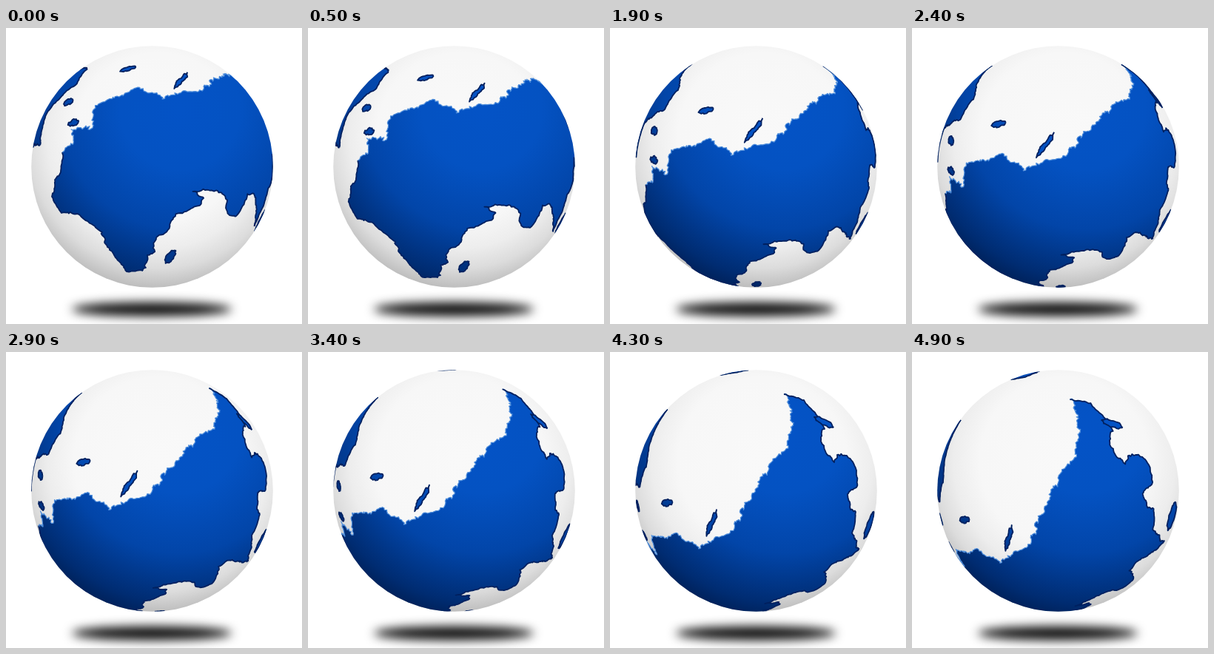
Recreate the animation shown at these times as an HTML page with a canvas. Size 400 px wide and 400 px high, loop 5000 ms.

```html
<!DOCTYPE html>
<html lang="en">
<head>
<meta charset="utf-8">
<title>Turning globe</title>
<style>
  html, body { margin: 0; width: 100%; height: 100%; overflow: hidden; background: #fff; }
  canvas { display: block; width: 400px; height: 400px; }
</style>
</head>
<body>
<canvas id="stage" width="400" height="400"></canvas>
<script>
const ctx = document.getElementById('stage').getContext('2d');
const CX = 197.5, CY = 187.5, R = 163.3;
const STEPS = 50, STEP_MS = 100;
const DARK = { stroke: '#00205f', width: 1.8, tooth: 0.011 };
const LIGHT = { stroke: '#4f8edb', width: 1.2, tooth: 0.024 };

let seed = 7;
const rnd = () => (seed = (seed * 16807) % 2147483647) / 2147483647 - 0.5;

const apply = (m, v) => m.map(r => r[0] * v[0] + r[1] * v[1] + r[2] * v[2]);
const flip = m => m.map((_, i) => m.map(r => r[i]));
const unit = v => { const n = Math.hypot(...v); return v.map(c => c / n); };

function rotation(w) {
  const a = Math.hypot(...w), [x, y, z] = unit(w);
  const c = Math.cos(a), s = Math.sin(a), k = 1 - c;
  return [
    [c + x * x * k, x * y * k - z * s, x * z * k + y * s],
    [x * y * k + z * s, c + y * y * k, y * z * k - x * s],
    [x * z * k - y * s, y * z * k + x * s, c + z * z * k]
  ];
}

// The spin axis drifts slowly, so the poses are composed step by step.
const poses = [[[1, 0, 0], [0, 1, 0], [0, 0, 1]]];
for (let i = 0; i < STEPS - 1; i++) {
  const t = (i + 0.5) / 10, rad = Math.PI / 180;
  const phi = (12.5 * t - 12) * rad, size = 15.5 - 0.4 * t;
  const w = [size * Math.cos(phi), 0.4 * t - 10.2, size * Math.sin(phi)];
  const turn = rotation(w.map(c => c * rad / 10));
  poses.push(flip(flip(poses[i]).map(c => apply(turn, c))));
}

// Points outside the disc stand for the far side of the sphere.
function lift(pose, x, y) {
  let u = (x - CX) / R, v = (CY - y) / R;
  const r = Math.hypot(u, v);
  let z = Math.sqrt(Math.max(0, 1 - r * r));
  if (r > 1) {
    const q = 2 - r;
    u *= q / r; v *= q / r; z = -Math.sqrt(1 - q * q);
  }
  return apply(flip(pose), [u, v, z]);
}

function flat(pose, p) {
  const [x, y, z] = apply(pose, p);
  const r = Math.hypot(x, y) || 1e-6;
  const k = z >= 0 ? 1 : (2 - r) / r;
  return [CX + x * k * R, CY - y * k * R];
}

// Midpoint displacement gives the ragged shoreline.
function crinkle(a, b, tooth) {
  const len = Math.hypot(...a.map((c, j) => c - b[j]));
  if (len < 0.026) return [a];
  const push = tooth + Math.min(len, 0.15) * 0.15;
  const mid = unit(a.map((c, j) => (c + b[j]) / 2 + rnd() * push));
  return [...crinkle(a, mid, tooth), ...crinkle(mid, b, tooth)];
}

// Each part is [step, edge, x, y, x, y, ...]; parts join into a closed shape.
function land(...parts) {
  const raw = parts.map(([step, , ...xy]) =>
    xy.flatMap((x, i) => i % 2 ? [] : [lift(poses[step], x, xy[i + 1])]));
  return parts.map(([, edge], i) => {
    const pts = [...raw[i], raw[(i + 1) % raw.length][0]];
    const fine = pts.slice(1).flatMap((p, k) => crinkle(pts[k], p, edge.tooth));
    return { edge, pts: [...fine, pts[pts.length - 1]] };
  });
}

function isle(step, x, y, rx, ry, tilt) {
  const xy = [], c = Math.cos(tilt), s = Math.sin(tilt);
  for (let a = 0; a < 6.2; a += Math.PI / 4) {
    const u = rx * Math.cos(a), v = ry * Math.sin(a);
    xy.push(x + u * c - v * s, y + u * s + v * c);
  }
  return land([step, DARK, ...xy]);
}

const lands = [
  land(
    [0, DARK, 185,328, 163,329, 140,300, 130,276, 100,253, 75,250, 62,228, 66,205, 74,193],
    [0, LIGHT, 76,168, 91,156, 88,137, 105,135, 117,135, 121,108, 150,92, 178,80, 205,90],
    [24, LIGHT, 150,193, 165,186, 203,175, 222,158, 232,142, 257,117, 270,105, 290,97],
    [43, LIGHT, 242,118, 244,88],
    [43, DARK, 235,57, 262,65, 275,80, 290,104, 285,115, 295,140, 303,149, 307,139, 320,140,
      333,160, 333,183, 321,192, 325,213, 332,216, 327,245, 333,262],
    [24, DARK, 325,285, 302,276, 290,283],
    [11, DARK, 289,286, 276,283, 272,269, 257,261, 223,265, 239,272, 234,281, 201,292, 194,308],
    [0, DARK, 203,283, 200,303, 191,307]),
  land(
    [19, DARK, 111,48, 92,84, 80,98, 74,110, 47,128],
    [49, DARK, 25,225, 15,150, 30,85, 60,88]),
  isle(49, 152, 29, 22, 5, -0.28),
  isle(49, 351, 222, 20, 4, -1.3),
  isle(43, 289, 95, 15, 4, 0.5),
  isle(24, 117, 130, 10, 4, -0.2),
  isle(24, 180, 158, 21, 3, -0.96),
  isle(19, 60, 139, 4, 6, 0),
  isle(0, 91, 128, 8, 4, -0.4),
  isle(0, 222, 309, 11, 5, -0.95)
];

function trace(pose, pts, start) {
  pts.forEach((p, i) => {
    const [x, y] = flat(pose, p);
    if (i || !start) ctx.lineTo(x, y); else ctx.moveTo(x, y);
  });
}

function radial(x, y, r, stops) {
  const g = ctx.createRadialGradient(x, y, 0, x, y, r);
  stops.forEach(([at, colour]) => g.addColorStop(at, colour));
  return g;
}

const white = radial(206, 148, 208,
  [[0, '#f9f9f9'], [0.55, '#f7f7f7'], [0.72, '#ededed'], [0.85, '#dcdcdc'], [1, '#b8b8b8']]);
const blue = radial(235, 110, 270,
  [[0, '#0453c6'], [0.3, '#0452c2'], [0.6, '#0245a8'], [0.85, '#002c72'], [1, '#001845']]);

function shadow() {
  ctx.save();
  ctx.filter = 'blur(7px)';
  ctx.fillStyle = '#0c0c0c';
  ctx.beginPath();
  ctx.ellipse(197, 380, 108, 9.5, 0, 0, Math.PI * 2);
  ctx.fill();
  ctx.restore();
}

function draw(step) {
  const pose = poses[step];
  ctx.fillStyle = '#fff';
  ctx.fillRect(0, 0, 400, 400);
  shadow();
  ctx.save();
  ctx.beginPath();
  ctx.arc(CX, CY, R, 0, Math.PI * 2);
  ctx.clip();
  ctx.fillStyle = white;
  ctx.fillRect(0, 0, 400, 400);
  ctx.lineJoin = 'round';
  for (const parts of lands) {
    ctx.beginPath();
    parts.forEach((part, i) => trace(pose, part.pts, i === 0));
    ctx.closePath();
    ctx.fillStyle = blue;
    ctx.fill();
    for (const { edge, pts } of parts) {
      ctx.beginPath();
      trace(pose, pts, true);
      ctx.strokeStyle = edge.stroke;
      ctx.lineWidth = edge.width;
      ctx.stroke();
    }
  }
  ctx.restore();
}

const began = performance.now();
let shown = -1;
function tick() {
  const step = Math.floor((performance.now() - began) / STEP_MS) % STEPS;
  if (step !== shown) draw(shown = step);
  requestAnimationFrame(tick);
}
tick();
</script>
</body>
</html>
```
